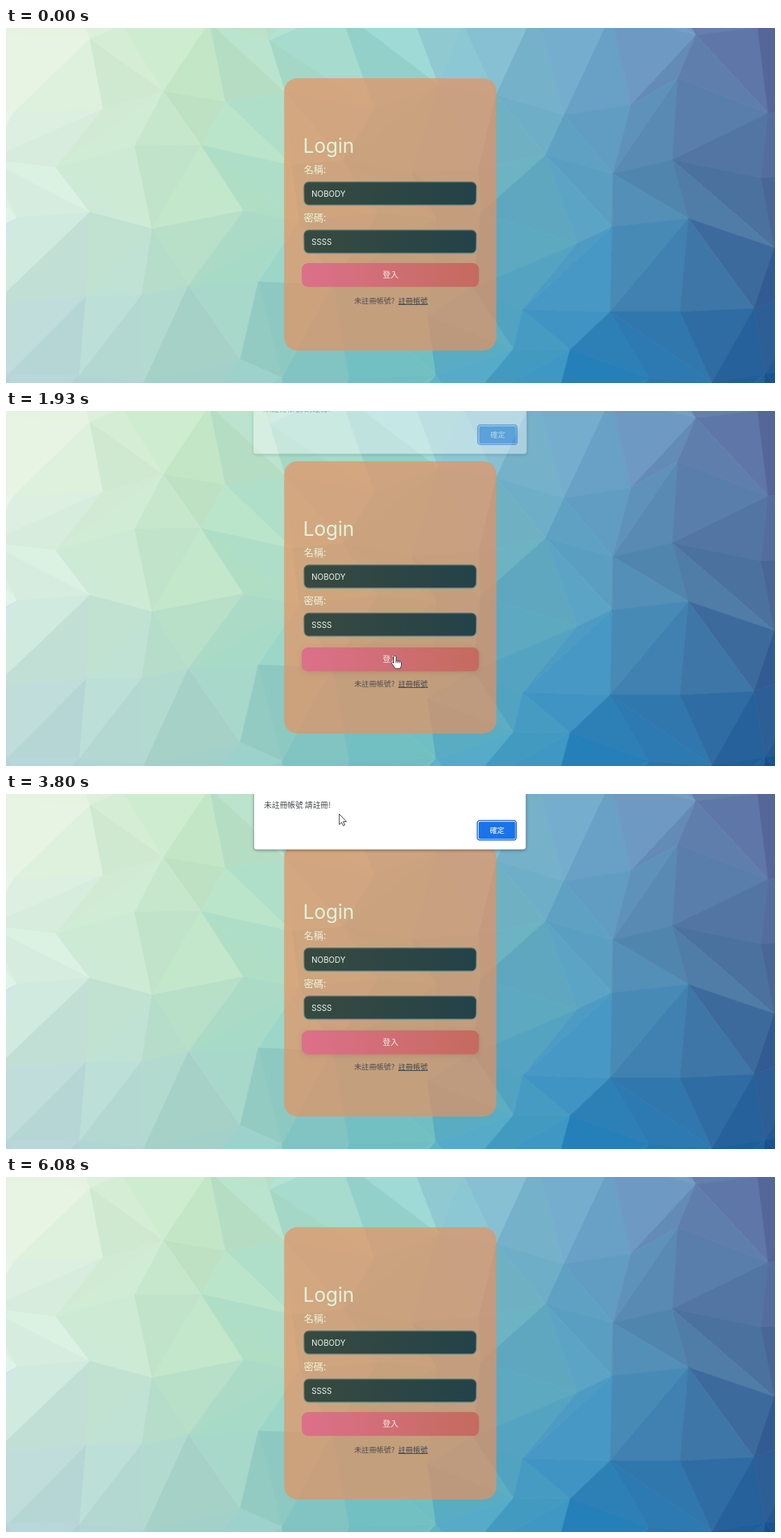
An HTML page for the animation above (6410 ms loop, 1100 by 509 pixels).

```html
<!DOCTYPE html>
<html lang="zh-Hant">
<head>
<meta charset="utf-8">
<title>Login</title>
<style>
html, body { margin: 0; width: 100%; height: 100%; overflow: hidden; }
svg { display: block; width: 100%; height: 100%; }
text { font-family: Inter, "Noto Sans CJK TC", "Noto Sans CJK", sans-serif; font-size: 10.6px; }
.zh { font-family: "Noto Sans CJK TC", "Noto Sans CJK", sans-serif; font-weight: 300; }
.mid { text-anchor: middle; }
.title { font-size: 28px; fill: #def5dd; }
.label { font-size: 14px; fill: #e6f4da; }
.field { fill: url(#dark); stroke: url(#rim); stroke-width: 1.4; }
.entry { font-size: 11.3px; fill: #eef8ee; }
.link { fill: #3f4a50; text-decoration: underline 1px; text-underline-offset: 1px; }
.pressed { filter: drop-shadow(0 2px 4px rgba(60, 40, 30, .12)); }
.sheet { filter: drop-shadow(0 1px 2px rgba(0, 0, 0, .45)); }
</style>
</head>
<body>
<svg viewBox="0 0 1100 509" preserveAspectRatio="none">
  <defs>
    <linearGradient id="dark"><stop stop-color="#384a3f"/><stop offset="1" stop-color="#234249"/></linearGradient>
    <linearGradient id="pink"><stop stop-color="#dc708a"/><stop offset="1" stop-color="#c46b5e"/></linearGradient>
    <linearGradient id="rim" x2="0" y2="1"><stop stop-color="#4a6a66"/><stop offset="1" stop-color="#6c9290"/></linearGradient>
  </defs>
  <g id="mesh"></g>
  <rect x="397.8" y="72" width="303.7" height="390.5" rx="19" fill="rgb(231,146,97)" fill-opacity=".7"/>
  <text class="title" x="425" y="179">Login</text>
  <text class="zh label" x="426" y="208">名稱:</text>
  <rect class="field" x="426.3" y="221" width="246.4" height="33" rx="7"/>
  <text class="entry" x="437" y="242">NOBODY</text>
  <text class="zh label" x="426" y="277">密碼:</text>
  <rect class="field" x="426.3" y="290" width="246.4" height="33" rx="7"/>
  <rect id="glow" x="426" y="289.5" width="247" height="34" rx="7" fill="#93989b" fill-opacity=".19"/>
  <text class="entry" x="437" y="311">SSSS</text>
  <g id="submit">
    <rect x="423" y="337" width="253.6" height="34.3" rx="9" fill="url(#pink)"/>
    <text class="zh mid" x="550" y="358" style="font-size:11.3px" fill="#f3efe2">登入</text>
  </g>
  <text class="zh" x="498" y="395" fill="#50504e">未註冊帳號?</text>
  <text class="zh link" x="561" y="395">註冊帳號</text>
  <g id="dialog">
    <rect class="sheet" x="355" y="-40" width="388.5" height="119.5" rx="4" fill="#fff"/>
    <text class="zh" x="369" y="19.5" style="font-size:11.2px" fill="#454a4d">未註冊帳號 請註冊!</text>
    <rect id="focus" x="674.2" y="38" width="55.6" height="28" rx="3.5" fill="#fff" stroke="#2a6fd6" stroke-width="1.7"/>
    <rect id="ok" x="676" y="39.7" width="52.5" height="24.8" rx="2"/>
    <text class="zh mid" x="702.5" y="56" fill="#fff">確定</text>
  </g>
  <circle id="click" r="10.5" fill="#ff0" fill-opacity=".47"/>
  <g id="cursor" fill="#fff" stroke="#333" stroke-linejoin="round">
    <path id="arrow" d="M.5 .5V15.5L3.8 12.4 6 17.2 8.4 16.2 6.2 11.4H10.8Z"/>
    <path id="hand" d="M-1 -1c1 0 2 .8 2 2v5c3 0 7 .8 7.5 2.2v4c0 2-1 3-1.5 5H-.5C-2 14-4.5 11.5-5.5 9.5c0-1.6 1.5-1.6 3 0V1c0-1.2.6-2 1.5-2zM1 6v3.5M3.6 6.5v3M6.1 7v2.5"/>
  </g>
</svg>
<script>
const $ = id => document.getElementById(id);
const W = 1100, H = 509, LOOP = 6410, CELL = 96;

const mix = (a, b, f) => a + (b - a) * f;
const clamp = v => Math.max(0, Math.min(1, v));
const show = (id, on) => $(id).style.display = on ? '' : 'none';

// Seeded noise in -0.5 .. 0.5
function noise(a, b) {
  const n = Math.sin(a * 12.9898 + b * 78.233) * 43758.5453;
  return n - Math.floor(n) - .5;
}

// Background tint: three rows of colours, blended across the stage
const tints = [
  'f2f9ea c4e6c6 9ed8d4 78aed2 5c6a9e',
  'd9efe4 bfe5c8 80c9be 579fc2 4a6898',
  'b9d6dc a2cfc8 6cbfc6 2a86c0 1a5490'
].map(row => row.split(' ').map(c => [0, 2, 4].map(i => parseInt(c.slice(i, i + 2), 16))));

function tint(x, y) {
  const u = clamp(x / W) * 4, v = clamp(y / H) * 2;
  const i = Math.min(3, u | 0), j = Math.min(1, v | 0);
  const light = noise(x, y) * 10;
  return `rgb(${[0, 1, 2].map(c => Math.round(light + mix(
    mix(tints[j][i][c], tints[j][i + 1][c], u - i),
    mix(tints[j + 1][i][c], tints[j + 1][i + 1][c], u - i), v - j)))})`;
}

// Low-poly mesh: a shaken grid, each cell cut along one diagonal
const corner = (i, j) => [
  Math.round((i + noise(i, j) * .6 + (j % 2) * .3) * CELL),
  Math.round((j + noise(j + 40, i) * .6) * CELL)];

function triangle(a, b, c) {
  const fill = tint((a[0] + b[0] + c[0]) / 3, (a[1] + b[1] + c[1]) / 3);
  return `<path d="M${a}L${b}L${c}Z" fill="${fill}" stroke="${fill}" stroke-width=".7"/>`;
}

function buildMesh() {
  let out = '';
  for (let i = -1; i <= W / CELL; i++)
    for (let j = -1; j <= H / CELL; j++) {
      const a = corner(i, j), b = corner(i + 1, j), c = corner(i + 1, j + 1), d = corner(i, j + 1);
      out += noise(i + 9, j + 9) > 0
        ? triangle(a, b, c) + triangle(a, c, d)
        : triangle(a, b, d) + triangle(b, c, d);
    }
  $('mesh').innerHTML = out;
}

// Pointer path: tick, x, y
const path = [
  [0, 997, 495], [8, 547, 327], [11, 566, 282], [15, 562, 334.5], [18, 557, 352],
  [27, 557, 352], [29, 598, 300], [36, 357, 21], [39, 364, 2], [43, 466, 28],
  [46, 435, 35], [50, 600, 8], [54, 742, 50], [57, 710, 56], [64, 704, 56],
  [70, 923, 405], [76, 1060, 515]];

function pointerAt(k) {
  const i = Math.max(1, path.findIndex(p => p[0] >= k));
  const [k0, x0, y0] = path[i - 1], [k1, x1, y1] = path[i];
  const f = (k - k0) / (k1 - k0);
  return [mix(x0, x1, f), mix(y0, y1, f)];
}

function draw(t) {
  // The screen refreshes in ticks of about 78 ms
  const k = t < 140 ? -1 : Math.floor((t - 140) / 78.1 + .3);

  const moving = k >= 0 && k < 76;
  show('cursor', moving);
  if (moving) {
    const at = `translate(${pointerAt(k)})`;
    $('cursor').setAttribute('transform', at);
    $('click').setAttribute('transform', at);
  }
  const isHand = k >= 18 && k < 28;
  show('hand', isHand);
  show('arrow', !isHand);
  show('click', k === 21 || k === 22 || k === 62);

  $('glow').style.opacity = clamp(Math.min((k - 9) / 2, (17 - k) / 2));
  const pressed = k >= 17 && k < 63;
  $('submit').setAttribute('transform', `translate(0 ${pressed ? 2 : 0})`);
  $('submit').setAttribute('class', pressed ? 'pressed' : '');

  show('dialog', k >= 23 && k < 66);
  const away = clamp(Math.max((26 - k) / 3, (k - 62) / 3));
  const grow = 1 + .006 * away;
  $('dialog').setAttribute('transform',
    `translate(${549 * (1 - grow)} ${-18 * away * away}) scale(${grow} 1)`);
  $('dialog').style.opacity = 1 - .6 * away ** 3;
  show('focus', k < 63);
  $('ok').setAttribute('fill', k >= 54 ? '#2b7de9' : '#1a73e8');
}

let start;
function step(now) {
  start ??= now;
  draw((now - start) % LOOP);
  requestAnimationFrame(step);
}

buildMesh();
requestAnimationFrame(step);
</script>
</body>
</html>
```
